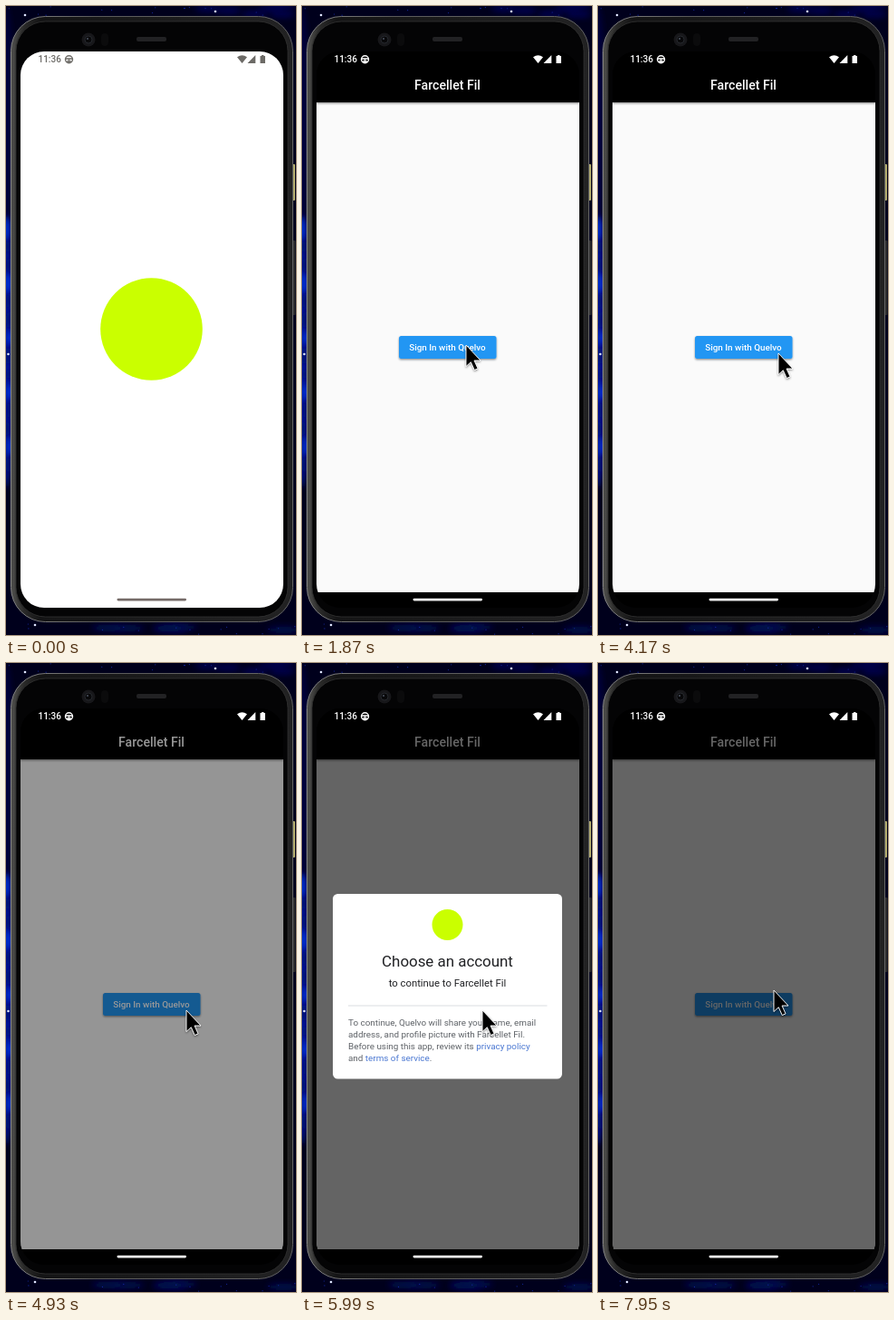
An HTML page for the animation above (8000 ms loop, 320 by 692 pixels).

```html
<!DOCTYPE html>
<html lang="en">
<head>
<meta charset="utf-8">
<title>Sign-in demo</title>
<style>
  html, body { margin: 0; width: 100%; height: 100%; overflow: hidden; background: #00000f; }
  svg { display: block; width: 100%; height: 100%; font-family: Roboto, sans-serif; }
  .mid { text-anchor: middle; }
  .medium { font-weight: 500; }
  .link { fill: #4b78d2; }
</style>
</head>
<body>
<svg viewBox="0 0 320 692">
  <defs>
    <clipPath id="screenClip"><rect x="16" y="50" width="290" height="612" rx="26"/></clipPath>
    <filter id="soft" x="-100%" y="-100%" width="300%" height="300%"><feGaussianBlur stdDeviation="3"/></filter>
    <filter id="drop" x="-50%" y="-50%" width="200%" height="200%">
      <feDropShadow dx="0" dy="1.2" stdDeviation="1" flood-opacity=".45"/>
    </filter>
    <linearGradient id="rim" x2="1" y2="0">
      <stop offset="0" stop-color="#8a8a88"/><stop offset=".3" stop-color="#5a5a5a"/><stop offset="1" stop-color="#666"/>
    </linearGradient>
    <linearGradient id="metal" x2="1" y2="0">
      <stop offset="0" stop-color="#4a4a48"/><stop offset=".04" stop-color="#2a2a29"/>
      <stop offset=".1" stop-color="#141415"/><stop offset="1" stop-color="#222223"/>
    </linearGradient>
  </defs>

  <rect width="320" height="692" fill="#00001c"/>
  <g id="sky"></g>

  <g id="phone">
    <rect x="315" y="174" width="4" height="40" rx="1" fill="#b3ad6c"/>
    <rect x="315" y="258" width="4.5" height="82" rx="1" fill="#2b2b2d"/>
    <rect x="5.5" y="11.5" width="311" height="666" rx="38" fill="url(#metal)" stroke="url(#rim)"/>
    <rect x="8" y="14" width="306" height="661" rx="35.5" fill="none" stroke="url(#metal)" stroke-width="3"/>
    <rect x="11" y="17" width="300" height="655" rx="32.5" fill="#040405" stroke="#343434" stroke-width=".8"/>
    <rect x="144" y="34" width="33" height="5" rx="2" fill="#222224"/>
    <circle cx="91" cy="37" r="7.5" fill="#17171a"/>
    <circle cx="91" cy="37" r="4" fill="#08080a" stroke="#25282d"/>
    <circle cx="90" cy="36" r="1" fill="#4b5360"/>
    <rect x="105" y="30" width="8" height="14" rx="4" fill="#0b0b0c"/>
  </g>

  <g clip-path="url(#screenClip)">
    <g id="splash">
      <rect x="16" y="50" width="290" height="612" fill="#fff"/>
      <circle cx="160.5" cy="355.5" r="56.3" fill="#caff00"/>
    </g>
    <g id="app">
      <rect x="16" y="50" width="290" height="612"/>
      <rect x="16" y="106" width="290" height="539" fill="#fafafa"/>
      <rect x="16" y="50" width="290" height="56" filter="url(#drop)"/>
      <text class="mid medium" x="160.5" y="91.5" font-size="14.1" fill="#fff">Farcellet Fil</text>
      <rect x="107" y="363" width="107.5" height="25" rx="2.5" fill="#2196f3" filter="url(#drop)"/>
      <text class="mid medium" x="160.5" y="379.3" font-size="9.9" fill="#fff">Sign In with Quelvo</text>
      <rect id="dim" x="16" y="50" width="290" height="595"/>
    </g>
    <g id="loading"></g>
    <g id="accounts"></g>
  </g>

  <g id="status">
    <text class="medium" x="35.5" y="62.3" font-size="10">11:36</text>
    <circle cx="69.5" cy="58.8" r="4" fill="none" stroke="currentColor" stroke-width="1.4"/>
    <path d="M65.5 58h8M67 61h5M69.5 58v5" stroke="currentColor" stroke-width="1.3"/>
    <path d="M255 56.3Q260.5 52.3 266 56.3L260.5 63ZM275.3 54V63H266.5ZM280.5 55h1.5v-1h2.5v1H286v8h-5.5Z"/>
  </g>
  <rect id="handle" x="122.5" y="651.8" width="76.5" height="2.6" rx="1.3"/>

  <path id="cursor" d="M0 0V23.5L5.3 18.7 9.3 27.5 13 25.8 9 17H16Z" stroke="#fff" stroke-width=".9"
        stroke-linejoin="round" filter="url(#drop)"/>
</svg>
<script>
const $ = id => document.getElementById(id);

function paintSky() {
  let seed = 7;
  const random = () => (seed = seed * 16807 % 2147483647) / 2147483647;
  const cloud = (x, y, rx, ry, color) =>
    `<ellipse cx="${x}" cy="${y}" rx="${rx}" ry="${ry}" fill="${color}" filter="url(#soft)"/>`;
  let sky = cloud(0, 130, 8, 130, '#00063c') + cloud(0, 380, 8, 150, '#0014a0');
  for (let i = 0; i < 14; i++)
    sky += cloud(random() * 6, 245 + i * 20, 4, 5 + random() * 8, i % 3 ? '#000c70' : '#0030d8');
  for (let i = 0; i < 6; i++) {
    sky += cloud(150 + random() * 170, random() * 10, 14, 4, '#00064c');
    sky += cloud(100 + random() * 220, 682 + random() * 8, 18, 4, '#00074c');
  }
  for (let i = 0; i < 30; i++) {
    const x = random() * 320, y = i % 2 ? random() * 11 : 680 + random() * 12;
    sky += `<circle cx="${x}" cy="${y}" r=".6" fill="#1428a0"/>`;
  }
  for (const [x, y] of [[231, 6], [21, 10], [2.5, 383], [32, 681]])
    sky += `<circle cx="${x}" cy="${y}" r="1.3" fill="#dfe6ff"/>`;
  $('sky').innerHTML = sky;
}

const text = (x, y, size, content, fill = '#202124', cls = '') =>
  `<text x="${x}" y="${y}" font-size="${size}" fill="${fill}" class="${cls}">${content}</text>`;
const divider = y => `<path d="M51 ${y}H270.5" stroke="#dadce0"/>`;
const link = label => `<tspan class="link">${label}</tspan>`;

function dialog(top, height, headingSize, noticeY, rows) {
  const notice = [
    'To continue, Quelvo will share your name, email',
    'address, and profile picture with Farcellet Fil.',
    `Before using this app, review its ${link('privacy policy')}`,
    `and ${link('terms of service')}.`
  ];
  return `<rect x="34" y="${top}" width="253" height="${height}" rx="5.5" fill="#fff"/>
    <circle cx="160.5" cy="${top + 34}" r="17" fill="#caff00"/>` +
    text(160.5, top + 79.5, headingSize, 'Choose an account', '#202124', 'mid') +
    text(160.5, top + 102, 11.3, 'to continue to Farcellet Fil', '#202124', 'mid') +
    rows +
    notice.map((line, i) => text(51, noticeY + i * 12.9, 9.9, line, '#5f6368')).join('');
}

function buildDialogs() {
  $('loading').innerHTML = dialog(254, 203.5, 16.9, 398.8, divider(377));
  $('accounts').innerHTML = dialog(217, 277, 17.1, 435.8,
    '<circle cx="61" cy="358.5" r="10" fill="#455a64"/>' +
    text(61, 361.5, 10, 'a', '#fff', 'mid') +
    text(79.5, 356.2, 9.9, 'Arnau Bru Sorn') +
    text(79.5, 368.3, 8.5, 'arnau.brusorn@mail.test', '#5f6368') +
    divider(379.5) +
    `<g fill="none" stroke="#5f6368" stroke-width="1.1">
      <circle cx="59.5" cy="393.5" r="2.4"/>
      <path d="M55 401v-1.5q4.5-3.5 9 0V401ZM64 395.5h5M66.5 393v5"/></g>` +
    text(77, 399.7, 10.2, 'Add another account') +
    divider(413.5));
}

// Cursor stops: time, x, y
const stops = [
  [1400, 330, 650], [1640, 225, 465], [1850, 181, 373], [2150, 181, 373], [2400, 199, 382],
  [6400, 199, 382], [6800, 233, 388], [7000, 233, 388], [7400, 194, 360], [8000, 194, 360]
];

function cursorAt(t) {
  const i = Math.max(1, stops.findIndex(stop => stop[0] > t));
  const [t0, x0, y0] = stops[i - 1], [t1, x1, y1] = stops[i];
  const p = Math.max(0, (t - t0) / (t1 - t0)), eased = p * p * (3 - 2 * p);
  return [x0 + (x1 - x0) * eased, y0 + (y1 - y0) * eased];
}

const show = (id, visible) => $(id).style.display = visible ? '' : 'none';

function render(t) {
  const inApp = t >= 1000;
  show('splash', !inApp);
  show('app', inApp);
  show('loading', t >= 5250 && t < 6250);
  show('accounts', t >= 6250 && t < 7650);
  show('cursor', t >= 1400);
  $('dim').setAttribute('opacity', 0.6 * Math.min(1, Math.max(0, (t - 4797) / 200)));
  $('status').style.fill = $('status').style.color = inApp ? '#fff' : '#6c6a66';
  $('handle').style.fill = inApp ? '#f4f4f4' : '#756b68';
  $('cursor').setAttribute('transform', `translate(${cursorAt(t)})`);
}

paintSky();
buildDialogs();
const start = performance.now();
function tick() {
  render((performance.now() - start) % 8000);
  requestAnimationFrame(tick);
}
tick();
</script>
</body>
</html>
```
